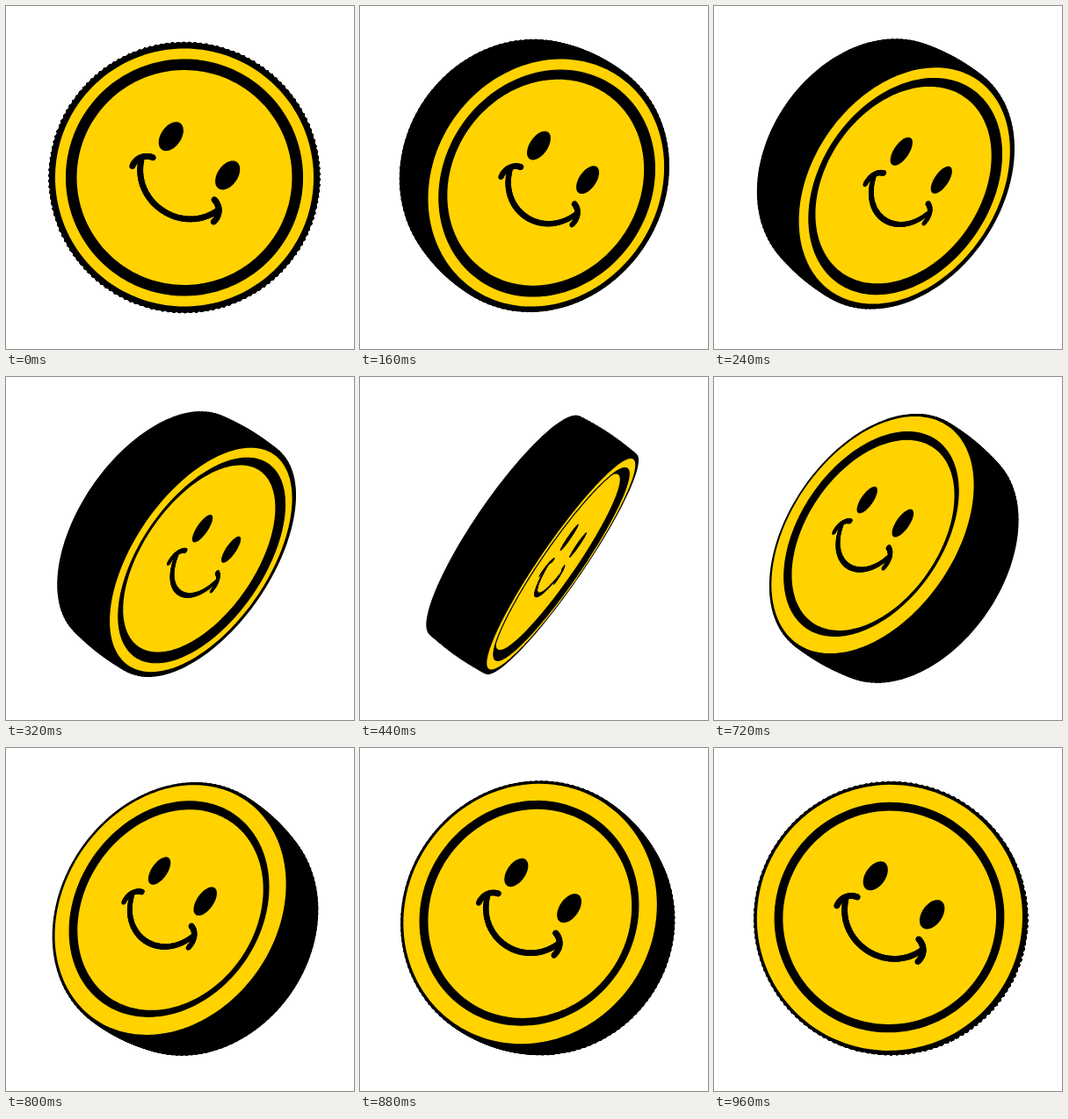
An HTML page with a canvas for the animation above (1000 ms loop, 396 px wide and 391 px high).

```html
<!DOCTYPE html>
<html lang="en">
<head>
<meta charset="utf-8">
<title>Spinning coin</title>
<style>
  html, body { margin: 0; width: 100%; height: 100%; overflow: hidden; background: #fff; }
  canvas { display: block; width: 396px; height: 391px; }
</style>
</head>
<body>
<canvas id="stage"></canvas>
<script>
const W = 396, H = 391, STEP = 40, STEPS = 25;
const YELLOW = '#ffd200', BLACK = '#000';
const CX = 203, CY = 195.5, TILT = 34.5 * Math.PI / 180, DIST = 1500;
const FRONT = { z: 34, side: 1, edge: 150.5, rim: 143.7, hole: 131.4, inner: 120.1, depth: 5 };
const BACK = { z: -44, side: -1, edge: 151, rim: 147.5, hole: 127.2, inner: 118.8, depth: 4 };

const canvas = document.getElementById('stage');
const ctx = canvas.getContext('2d');
const dpr = window.devicePixelRatio || 1;
canvas.width = W * dpr;
canvas.height = H * dpr;

const cosT = Math.cos(TILT), sinT = Math.sin(TILT);
let cosA = 1, sinA = 0;

// Turn about the tilted axis, then project with perspective.
function project(x, y, z) {
  const u = x * cosA + z * sinA;
  const s = DIST / (DIST + x * sinA - z * cosA);
  return [CX + s * (u * cosT - y * sinT), CY + s * (u * sinT + y * cosT)];
}

function trace(x, y, z, rx, ry, n, teeth = 0) {
  ctx.beginPath();
  for (let i = 0; i < n; i++) {
    const a = i / n * 2 * Math.PI;
    const k = 1 + teeth * Math.cos(150 * a);
    ctx.lineTo(...project(x + rx * k * Math.cos(a), y + ry * k * Math.sin(a), z));
  }
  ctx.closePath();
}

function disc(r, z, color) {
  trace(0, 0, z, r, r, 180);
  ctx.fillStyle = color;
  ctx.fill();
}

function cubic(p, t) {
  const s = 1 - t;
  const at = i => s * s * s * p[0][i] + 3 * s * s * t * p[1][i] + 3 * s * t * t * p[2][i] + t * t * t * p[3][i];
  return [at(0), at(1)];
}

const CAP = [[41.5, 1.5], [49, 3], [57.5, 10], [55, 22.5]];
const STROKES = [
  { p: [[-51, 10.5], [-33, 55.5], [33, 55.5], [51, 10.5]], r: 3.4, n: 90 },
  { p: CAP, r: 3.4, n: 28 },
  { p: CAP.map(([x, y]) => [-x, y]), r: 3.4, n: 28 }
];

function drawSmile(side, z) {
  ctx.fillStyle = BLACK;
  for (const x of [-38.3, 38.3]) {
    trace(side * x, -29.4, z, 11.3, 18, 48);
    ctx.fill();
  }
  for (const { p, r, n } of STROKES) {
    for (let i = 0; i <= n; i++) {
      const [x, y] = cubic(p, i / n);
      trace(side * x, y, z, r, r, 16);
      ctx.fill();
    }
  }
}

function drawFace(f) {
  const floor = f.z - f.side * f.depth;
  disc(f.rim, f.z, YELLOW);
  disc(f.hole, f.z, BLACK);
  ctx.save();
  ctx.clip();
  disc(f.inner, floor, YELLOW);
  drawSmile(f.side, floor);
  ctx.restore();
  trace(0, 0, f.z, f.hole, f.hole, 180);
  ctx.lineWidth = 1.2;
  ctx.strokeStyle = BLACK;
  ctx.stroke();
}

// Slightly bulging, finely toothed edge built from thin slices.
function drawEdge() {
  const n = 50;
  ctx.fillStyle = BLACK;
  for (let i = 1; i < n; i++) {
    const t = i / n;
    const r = BACK.edge + (FRONT.edge - BACK.edge) * t + 2.3 * Math.sin(Math.PI * t);
    trace(0, 0, BACK.z + (FRONT.z - BACK.z) * t, r, r, 900, 0.005);
    ctx.fill();
  }
  disc(BACK.edge, BACK.z, BLACK);
  disc(FRONT.edge, FRONT.z, BLACK);
}

function draw(now) {
  const k = Math.floor(now / STEP + 1e-4) % STEPS;
  const angle = k / STEPS * Math.PI;
  cosA = Math.cos(angle);
  sinA = Math.sin(angle);
  ctx.setTransform(dpr, 0, 0, dpr, 0, 0);
  ctx.fillStyle = '#fff';
  ctx.fillRect(0, 0, W, H);
  drawEdge();
  drawFace(cosA > 0 ? FRONT : BACK);
}

let start = null;
function tick(now) {
  if (start === null) start = now;
  draw(Math.max(0, now - start));
  requestAnimationFrame(tick);
}
draw(0);
requestAnimationFrame(tick);
</script>
</body>
</html>
```
